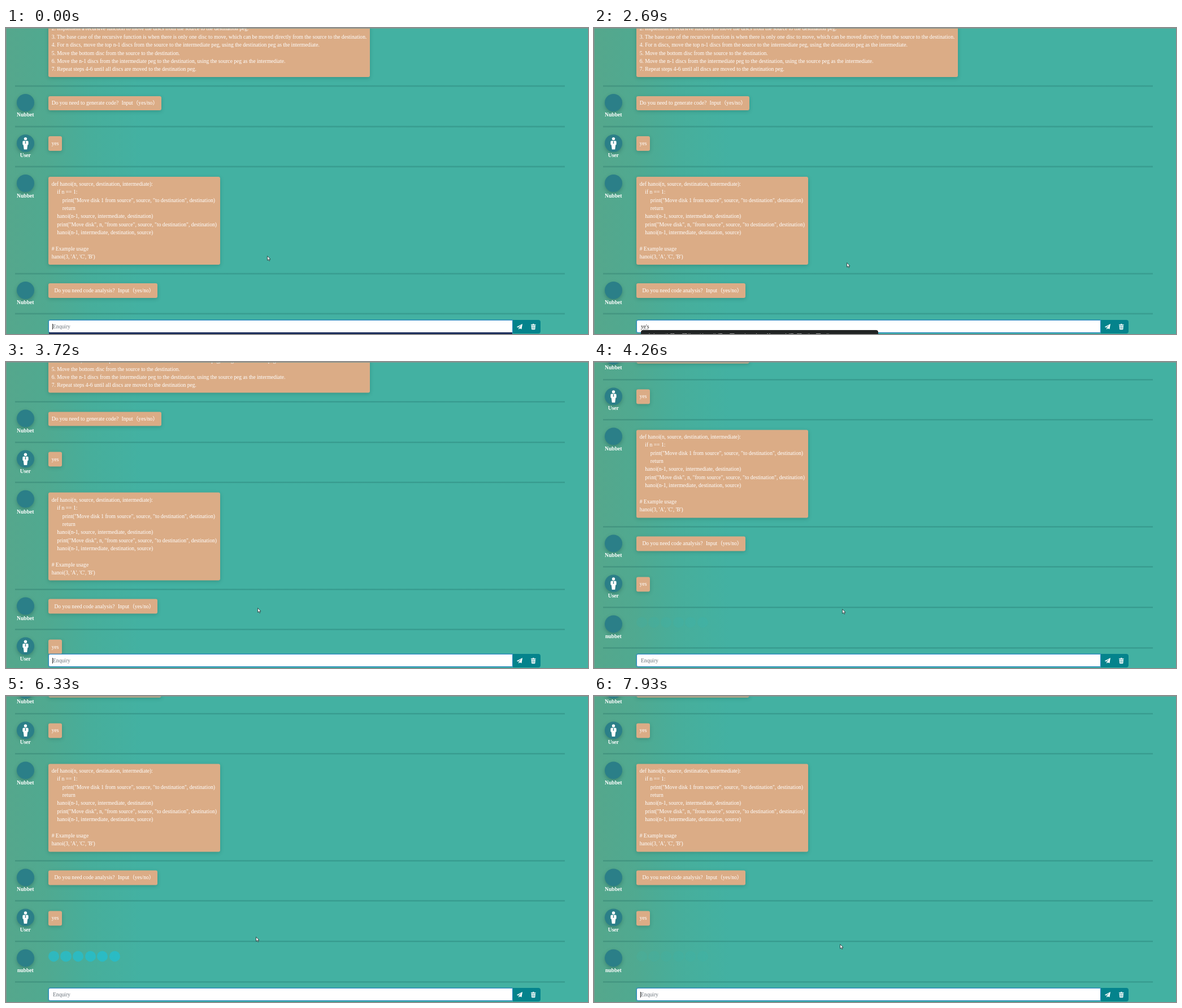
An HTML page for the animation above (8000 ms loop, 1030 by 543 pixels).

```html
<!DOCTYPE html>
<html lang="en">
<head>
<meta charset="utf-8">
<title>Chat</title>
<style>
  html, body { margin: 0; width: 100%; height: 100%; overflow: hidden; }
  body { font: 9.6px/14.4px "Liberation Serif", "Noto Sans CJK SC", serif; color: #fff; }
  #stage {
    position: relative; width: 1030px; height: 543px; overflow: hidden;
    background: linear-gradient(90deg, #55a78c 0, #50a990 70px, #47ae9b 150px, #43b1a2 240px);
  }
  #stage::after {
    content: ""; position: absolute; inset: 0;
    border: solid #7f9690; border-width: 1px 0 0 1px;
  }
  #stage div, #stage svg { position: absolute; }
  .rule {
    left: 16px; width: 973px; height: 4px; margin-top: -2px;
    background: linear-gradient(rgba(20,90,85,0), rgba(20,90,85,.3) 50%, rgba(20,90,85,0));
  }
  .bubble {
    left: 74.9px; padding: 5.76px; border-radius: 3px; white-space: pre;
    background: #dbac86; box-shadow: 0 2px 6px rgba(20,80,70,.28);
  }
  .bubble i { display: inline-block; width: 1em; font-style: normal; }
  .avatar {
    left: 18.9px; width: 31px; height: 31px; border-radius: 50%;
    background: #2b7f88; box-shadow: 0 3px 6px rgba(20,70,65,.35);
  }
  .avatar svg { left: 0; top: 0; }
  .name { left: 4.3px; width: 60px; text-align: center; font-weight: bold; }
  .dot { width: 19.2px; height: 19.2px; border-radius: 50%; background: #0dcaf0; }
  #dropdown { left: 76px; top: 540px; width: 820px; height: 3px; background: #1d2f5c; }
  #field {
    left: 75px; top: 518px; width: 819.5px; height: 21px; border: 1.5px solid #2a86c4;
    border-radius: 3px 0 0 3px; background: #fff; box-shadow: 0 0 2px #2b86bd;
  }
  #entry { left: 83px; top: 523px; white-space: pre; }
  #caret { left: 82px; top: 525px; width: 1px; height: 10px; background: #222; }
  #buttons { left: 897px; top: 518px; width: 48.5px; height: 24px; border-radius: 0 4px 4px 0; background: #04838c; }
  #popup {
    left: 83px; top: 536px; height: 30px; border-radius: 4px; overflow: hidden;
    background: #212424; color: #ddd; white-space: pre;
  }
  #popup span { position: absolute; left: 3px; top: 4px; }
</style>
</head>
<body>
<div id="stage">
  <div id="page"></div>
  <div id="field"></div>
  <div id="dropdown"></div>
  <div id="entry"></div>
  <div id="caret"></div>
  <div id="buttons">
    <svg width="48" height="24" fill="#fff">
      <path d="M6.8 12.6 17 7 15.4 16.4 12 15 10.4 17.2V14.3L15.2 8.8 9.2 13.6Z"/>
      <path d="M32 8h2.6l.6-.9h2.2l.6.9h2.5v1.2H32zM32.6 9.9h7.3l-.5 6.6q-.1.8-.9.8h-4.5q-.8 0-.9-.8z"/>
      <path d="M34.6 11v5M36.25 11v5M37.9 11v5" stroke="#04838c" stroke-width=".6"/>
    </svg>
  </div>
  <div id="popup"><span>1 夜色  2 也是  3 野生  4 液  5 业师  6 页  7 叶  8 夜  9 爷  ‹ ›   夜深  野   也   页   业</span></div>
  <svg id="pointer" width="9" height="12" viewBox="0 0 9 12">
    <path d="M.6.6V8.2L2.4 6.7 3.7 9.4 4.9 8.8 3.7 6.2H6Z" fill="#fff" stroke="#1c2c2c" stroke-width=".8"/>
  </svg>
</div>
<script>
const LOOP = 8000;
const BOT = "Nubbet";
const PERSON = `<svg width="31" height="31" fill="#fff"><circle cx="15.5" cy="7.6" r="2.7"/>
  <path d="M12 11.2h7q1.6 0 1.6 1.6v4.4q0 1.2-1.4 1.2L18.2 26.5h-5.4L11.8 18.4q-1.4 0-1.4-1.2v-4.4q0-1.6 1.6-1.6z"/>
  <path d="M14.6 11.2h1.8l-.5 1.2.5 3-.9 1.2-.9-1.2.5-3z" fill="#2b7f88"/></svg>`;

const steps = [
  "2. Implement a recursive function to move the discs from the source to the destination peg.",
  "3. The base case of the recursive function is when there is only one disc to move, which can be moved directly from the source to the destination.",
  "4. For n discs, move the top n-1 discs from the source to the intermediate peg, using the destination peg as the intermediate.",
  "5. Move the bottom disc from the source to the destination.",
  "6. Move the n-1 discs from the intermediate peg to the destination, using the source peg as the intermediate.",
  "7. Repeat steps 4-6 until all discs are moved to the destination peg."
].join("\n");

const code = `def hanoi(n, source, destination, intermediate):
    if n == 1:
        print("Move disk 1 from source", source, "to destination", destination)
        return
    hanoi(n-1, source, intermediate, destination)
    print("Move disk", n, "from source", source, "to destination", destination)
    hanoi(n-1, intermediate, destination, source)

# Example usage
hanoi(3, 'A', 'C', 'B')`;

const $ = id => document.getElementById(id);
const page = $("page");

function add(parent, cls, top, html = "") {
  const el = document.createElement("div");
  el.className = cls;
  el.style.top = top + "px";
  el.innerHTML = html;
  parent.append(el);
  return el;
}
const bubble = (parent, top, text) =>
  add(parent, "bubble", top, text.replace("？", "<i>?</i>"));

function row(parent, top, name, text) {
  add(parent, "avatar", top + 14, name === "User" ? PERSON : "");
  add(parent, "name", top + 44.4, name);
  if (text) bubble(parent, top + 17.6, text);
}

bubble(page, -11.3, steps);
const rules = [102.9, 174.6, 246.4, 435.5, 507.3, 579.1, 650.9];
rules.slice(0, 5).forEach(y => add(page, "rule", y));
row(page, rules[0], BOT, "Do you need to generate code？Input（yes/no）");
row(page, rules[1], "User", "yes");
row(page, rules[2], BOT, code);
row(page, rules[3], BOT, "  Do you need code analysis？Input（yes/no）");

// Rows that arrive after the answer is sent
const reply = add(page, "", 0);
rules.slice(5).forEach(y => add(reply, "rule", y));
row(reply, rules[4], "User", "yes");
row(reply, rules[5], BOT.toLowerCase());
const dots = Array.from({ length: 6 }, (_, i) => {
  const el = add(reply, "dot", rules[5] + 17);
  el.style.left = 74.8 + 21.6 * i + "px";
  return el;
});

// Runs of evenly spaced picture changes: first, last, count
const runs = [[290, 1220, 8], [1370, 1370, 1], [1830, 2380, 5], [2690, 3320, 6], [3590, 4530, 8],
  [4680, 5640, 8], [5760, 6730, 8], [6880, 7780, 8], [7930, 7930, 1]];
const ticks = [0, ...runs.flatMap(([a, b, n]) =>
  Array.from({ length: n }, (_, i) => i ? a + (b - a) * i / (n - 1) - 9 : a))];
const lastAt = (list, t, at = v => v) => list.filter(v => at(v) <= t).pop();

// time, x, y
const path = [[0, 462, 404], [200, 462, 404], [1220, 450, 418], [2380, 447, 416], [2690, 447, 416],
  [3320, 447, 436], [3590, 447, 436], [4200, 439, 438], [4600, 440, 438], [5200, 442, 427],
  [6750, 442, 427], [7780, 435, 442], [7930, 435, 440], [8000, 435, 440]];

function pointerAt(t) {
  const i = path.findIndex(p => p[0] > t);
  const [a, b] = [path[i - 1], path[i]];
  const u = (t - a[0]) / (b[0] - a[0]);
  return [a[1] + (b[1] - a[1]) * u, a[2] + (b[2] - a[2]) * u];
}

// time, entered text, right edge of the suggestion strip
const typing = [[0, "", 0], [1370, "y", 0], [1830, "ye", 539], [2220, "ye's", 503], [2900, "yes", 0], [3300, "", 0]];

function scrollAt(t) {
  if (t < 3590) return 0;
  const u = Math.min(1, (t - 3474) / 766);
  return 143.6 * (1 - Math.cos(Math.PI * u)) / 2;
}

function draw(now) {
  const t = lastAt(ticks, now % LOOP);
  page.style.transform = `translateY(${-scrollAt(t)}px)`;
  reply.style.display = t >= 3590 ? "" : "none";

  const phase = (((t - 5007) / 735) % 1 + 1) % 1;
  for (const d of dots) {
    d.style.transform = `scale(${Math.min(1, 2 * phase)})`;
    d.style.opacity = t < 4240 ? 0 : 1 - Math.abs(2 * phase - 1);
  }

  const [, text, edge] = lastAt(typing, t, v => v[0]);
  const entry = $("entry");
  entry.textContent = text || "Enquiry";
  entry.style.color = text ? "#222" : "#6c757d";
  entry.style.textDecoration = edge ? "underline dotted #555 1px" : "none";
  $("popup").style.display = edge ? "" : "none";
  $("popup").style.width = edge - 83 + "px";
  $("dropdown").style.display = t < 1370 ? "" : "none";

  const blink = t < 1370 ? t % 1000 < 500 : (t - 3500 + LOOP) % 1000 < 500;
  $("caret").style.display = blink && !text ? "" : "none";

  const [x, y] = pointerAt(t);
  $("pointer").style.transform = `translate(${Math.round(x)}px, ${Math.round(y)}px)`;
}

const start = performance.now();
(function frame() {
  draw(performance.now() - start);
  requestAnimationFrame(frame);
})();
</script>
</body>
</html>
```
